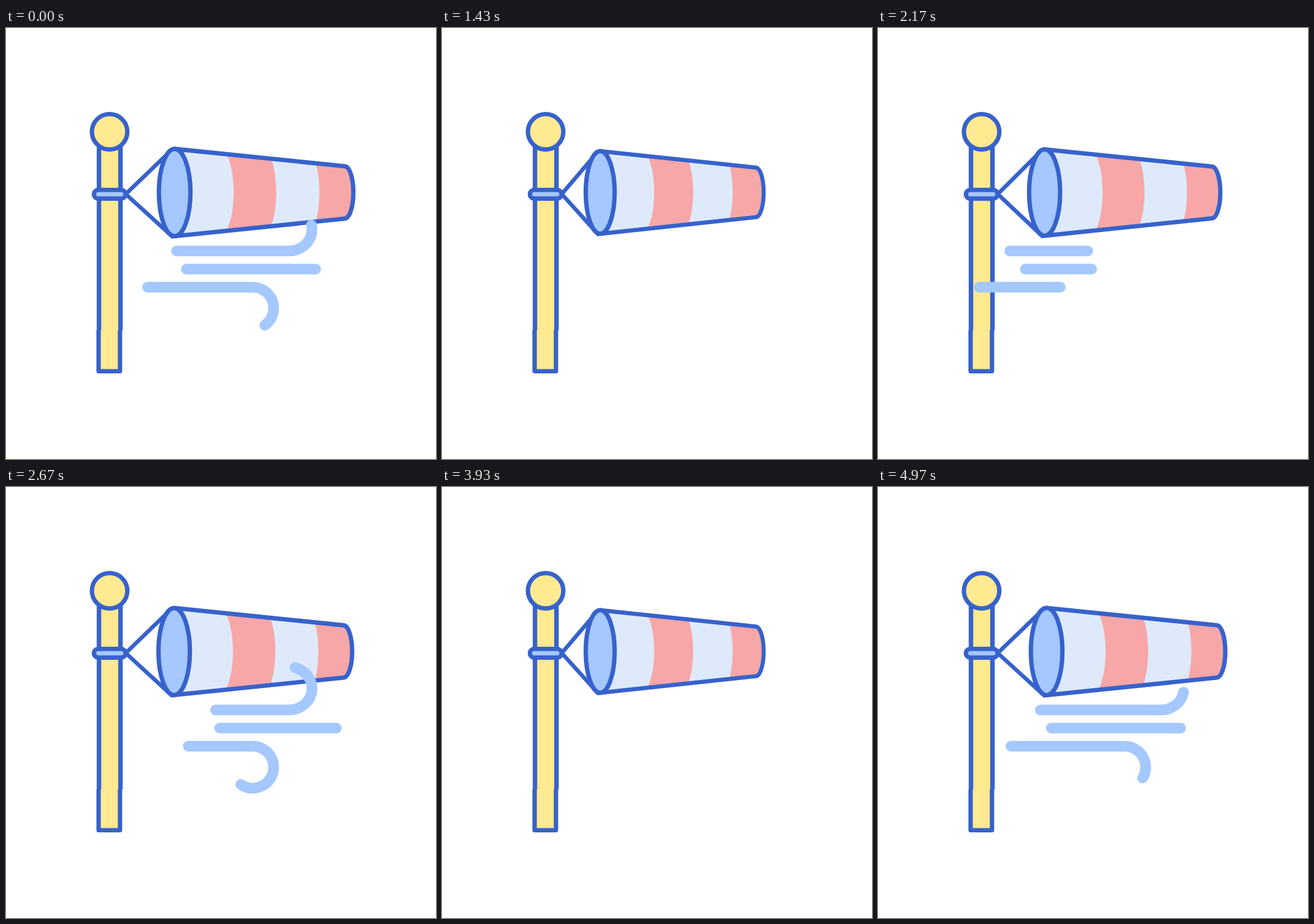
Recreate the animation shown at these times as an HTML page. Size 747 by 750 pixels, loop 5.01 s.

```html
<!DOCTYPE html>
<html>
<head>
<meta charset="utf-8">
<title>Windsock</title>
<style>
  html, body { margin: 0; width: 100%; height: 100%; overflow: hidden; background: #fff; }
  svg { display: block; width: 100vw; height: 100vh; }
  .line { stroke: #3762cc; stroke-width: 7.6; stroke-linejoin: round; stroke-linecap: round; fill: none; }
  .line * { vector-effect: non-scaling-stroke; }
  .yellow { fill: #ffe991; }
  .sky { fill: #a4c8ff; }
  .pale { fill: #deeafa; }
  .pink { fill: #f7a7a8; }
  .wind { fill: none; stroke: #a4c8ff; stroke-width: 18.6; stroke-linecap: round; }
</style>
</head>
<body>
<svg viewBox="0 0 747 750">
  <defs>
    <path id="cone" d="M293 210.4 L588 240.5 C597 240.5 603.4 262 603.4 286.3 S597 331.8 588 331.8 L293 362.2Z"/>
    <clipPath id="inside"><use href="#cone"/></clipPath>
  </defs>

  <g class="line">
    <path class="yellow" d="M161.6 200V526M198.7 526V200" stroke-linecap="butt"/>
    <rect class="yellow" x="161.6" y="200" width="37.1" height="326" stroke="none"/>
    <path d="M161.6 200V526M198.7 526V200" style="stroke-linecap:butt"/>
    <path class="yellow" d="M160.9 526V597.3H198V526" style="stroke-linecap:butt"/>
    <circle class="yellow" cx="180" cy="180.6" r="30.8"/>
    <polyline id="ropes" style="stroke-width:7"/>
    <rect class="sky" x="152.7" y="281.7" width="55" height="15.2" rx="7.6"/>
  </g>

  <g id="sock" class="line">
    <g id="stripes" clip-path="url(#inside)" stroke="none">
      <use href="#cone" class="pink"/>
    </g>
    <use href="#cone"/>
    <ellipse class="sky" cx="293" cy="286.3" rx="27.4" ry="75.9"/>
  </g>

  <g id="winds" class="wind">
    <path pathLength="1" d="M229 388H491.5A40 37.5 0 0 0 491.5 313"/>
    <path pathLength="1" d="M256 419.5H583"/>
    <path pathLength="1" d="M176 451H428.5A36.5 36.5 0 1 1 399.9 510.2"/>
  </g>
</svg>
<script>
const LOOP = 5010, STEP = 100 / 3, STEPS = 150;
const GUSTS = [-23, 53, 127];   // step at which each gust sets off
const GUST_LENGTH = 30, TAIL_LAG = 15;
const HALF = 75, SHORTEST = 39; // sock cycle, in steps
const $ = id => document.getElementById(id);

const ease = x => {
  x = Math.min(1, Math.max(0, x));
  return x * x * (3 - 2 * x);
};

// Each band covers everything left of a curved edge, so paint right to left.
for (const [edge, tone] of [[544.5, 'pale'], [469.5, 'pink'], [395.5, 'pale']])
  $('stripes').insertAdjacentHTML('beforeend',
    `<path class="${tone}" d="M200 210H${edge - 25}a25 76 0 0 1 0 152H200Z"/>`);

function drawSock(step) {
  const p = step % HALF;
  const slack = p < SHORTEST ? ease(p / SHORTEST) : 1 - ease((p - SHORTEST) / (HALF - SHORTEST));
  const sx = 1 - 0.088 * slack, sy = 1 - 0.055 * slack;
  const tx = 79 * (1 - sx), ty = 284 * (1 - sy);
  const place = (x, y) => `${tx + x * sx},${ty + y * sy}`;
  $('sock').setAttribute('transform', `matrix(${sx} 0 0 ${sy} ${tx} ${ty})`);
  $('ropes').setAttribute('points', `${place(288, 212)} 208,289 ${place(289, 363)}`);
}

function drawWind(step) {
  const start = GUSTS.findLast(s => s <= step);
  const head = ease((step - start) / GUST_LENGTH);
  const tail = ease((step - start - TAIL_LAG) / GUST_LENGTH);
  const winds = $('winds');
  winds.style.display = head > tail ? '' : 'none';
  for (const path of winds.children) {
    path.setAttribute('stroke-dasharray', `${head - tail} 2`);
    path.setAttribute('stroke-dashoffset', -tail);
  }
}

function draw() {
  const t = performance.now() % LOOP;
  const step = Math.min(STEPS - 1, Math.floor((t + 4) / STEP));
  drawSock(step);
  drawWind(step);
  requestAnimationFrame(draw);
}
draw();
</script>
</body>
</html>
```
